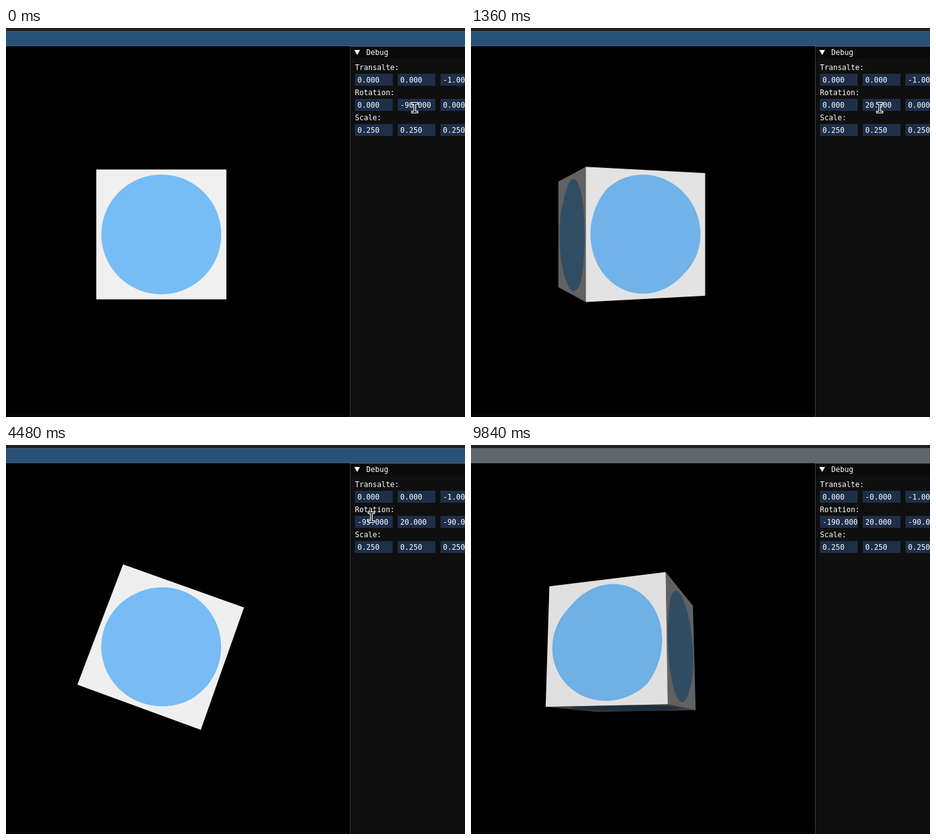
An HTML page with a canvas for the animation above (9.86 s loop, 730x620 px).

```html
<!DOCTYPE html>
<html lang="en">
<head>
<meta charset="utf-8">
<title>Cube transform panel</title>
<style>
html, body { margin: 0; width: 100%; height: 100%; overflow: hidden; background: #000; }
canvas { display: block; width: 730px; height: 620px; }
</style>
</head>
<body>
<canvas id="stage" width="730" height="620"></canvas>
<script>
const ctx = document.getElementById('stage').getContext('2d');
const LOOP = 9860;
const FOCAL = 300 / Math.tan(Math.PI / 8);
const HALF = 0.125;
const DISC = 0.922;
const COLS = [555, 623, 691];
const ROWS = [73, 113, 153];

// Drags: from, to, final value, number of equal jumps
const rotX = [[4300, 4480, -95, 4], [4760, 4880, -190, 2]];
const rotY = [[120, 320, -180, 9], [500, 540, -165, 3], [700, 700, -100, 1],
  [740, 880, -60, 3], [1180, 1360, 20, 4]];
const rotZ = [[3020, 3020, -40, 1], [3120, 3240, -90, 3]];
// the tiny negative prints as -0.000
const moveY = [[7320, 7400, 0.2, 2], [7480, 7480, -1e-4, 1],
  [7860, 8060, -0.5, 5], [8180, 8400, -1e-4, 5]];

// Pointer legs: from, to, x, y
const legs = [
  [1500, 1860, 684, 140], [1860, 2120, 662, 178], [2200, 2700, 716, 123],
  [3500, 3960, 581, 115], [5560, 5780, 662, 77], [6000, 6220, 643, 143],
  [6340, 6400, 648, 182], [6400, 6480, 643, 154], [6660, 6980, 653, 80],
  [8720, 8820, 697, 88], [8820, 9260, 188, 8], [9400, 9560, 98, -40]
];

const mix = (a, b, k) => a + (b - a) * k;
const mixPoint = (p, q, k) => [mix(p[0], q[0], k), mix(p[1], q[1], k)];

function dragged(drags, t, value, unit) {
  for (const [from, to, goal, jumps] of drags) {
    if (t < from) break;
    const done = t >= to ? jumps : 1 + Math.floor((t - from) / (to - from) * (jumps - 1));
    value = done === jumps ? goal : Math.round(mix(value, goal, done / jumps) / unit) * unit;
  }
  return value;
}

function pointerAt(t) {
  let p = [650, 127];
  for (const [from, to, x, y] of legs) {
    const k = Math.min(1, Math.max(0, (t - from) / (to - from)));
    p = mixPoint(p, [x, y], k * k * (3 - 2 * k));
  }
  return p;
}

function rect(x, y, w, h, color) {
  ctx.fillStyle = color;
  ctx.fillRect(x, y, w, h);
}

function text(s, x, y) {
  ctx.fillStyle = '#fff';
  ctx.fillText(s, x, y);
}

function poly(points, color) {
  ctx.beginPath();
  for (const [x, y] of points) ctx.lineTo(x, y);
  ctx.closePath();
  ctx.fillStyle = color;
  ctx.fill();
}

function stroke(width, color) {
  ctx.lineWidth = width;
  ctx.strokeStyle = color;
  ctx.stroke();
}

// Turn about z, then y, then x
function rotate([x, y, z], angles) {
  const [a, b, c] = angles.map(d => d * Math.PI / 180);
  [x, y] = [x * Math.cos(c) - y * Math.sin(c), x * Math.sin(c) + y * Math.cos(c)];
  [x, z] = [x * Math.cos(b) + z * Math.sin(b), z * Math.cos(b) - x * Math.sin(b)];
  [y, z] = [y * Math.cos(a) - z * Math.sin(a), y * Math.sin(a) + z * Math.cos(a)];
  return [x, y, z];
}

function shade(rgb, light) {
  return `rgb(${rgb.map(c => Math.round(c * light)).join(',')})`;
}

function drawFace(axis, side, angles, ty) {
  const at = (u, v) => {
    const p = [0, 0, 0];
    p[axis] = side;
    p[(axis + 1) % 3] = u;
    p[(axis + 2) % 3] = v;
    return rotate(p, angles);
  };
  const n = at(0, 0);
  // skip faces turned away from the eye
  if (n[1] * ty - n[2] + HALF >= 0) return;
  const corner = (u, v) => {
    const [x, y, z] = at(u, v).map(c => c * HALF);
    const k = FOCAL / (1 - z);
    return [247 + x * k, 329 - (y + ty) * k];
  };
  const a = corner(-1, -1), b = corner(1, -1), c = corner(1, 1), d = corner(-1, 1);
  // The texture is mapped flat on each half of the face, split along b-d
  const onFace = (u, v) => {
    const [o, p, q, s] = u + v < 0 ? [a, b, d, 1] : [c, d, b, -1];
    const i = (1 + s * u) / 2, j = (1 + s * v) / 2;
    return [0, 1].map(m => o[m] + (p[m] - o[m]) * i + (q[m] - o[m]) * j);
  };
  const rim = Array.from({ length: 72 }, (_, i) => {
    const angle = i * Math.PI / 36;
    return onFace(DISC * Math.cos(angle), DISC * Math.sin(angle));
  });
  const light = 0.1 + 0.9 * Math.max(0, n[2]);
  poly([a, b, c, d], shade([240, 240, 240], light));
  poly(rim, shade([119, 189, 245], light));
}

function drawView(angles, ty) {
  ctx.save();
  ctx.beginPath();
  ctx.rect(0, 29, 547, 587);
  ctx.clip();
  for (let axis = 0; axis < 3; axis++) {
    for (const side of [-1, 1]) drawFace(axis, side, angles, ty);
  }
  ctx.restore();
  rect(0, 616, 547, 4, '#070304');
}

function drawPanel(rows) {
  rect(547, 29, 183, 591, '#0f0f0f');
  rect(547, 29, 183, 19, '#0a0a0a');
  rect(547, 29, 183, 1, '#3c3c45');
  rect(547, 29, 1, 591, '#3c3c45');
  poly([[554, 35], [563, 35], [558.5, 43]], '#fff');
  text('Debug', 573, 43);
  ['Transalte:', 'Rotation:', 'Scale:'].forEach((label, r) => {
    text(label, 555, ROWS[r] - 6);
    COLS.forEach((x, c) => {
      rect(x, ROWS[r], 60, 19, '#1d2f49');
      text(rows[r][c].toFixed(3), x + 4, ROWS[r] + 14);
    });
  });
}

function drawBar(idle) {
  rect(0, 0, 730, 5, '#202020');
  rect(0, 5, 730, 24, idle ? '#666a75' : '#4a607b');
  rect(0, 6, 730, 22, idle ? '#5f676b' : '#275276');
}

function drawPointer([x, y]) {
  const overField = COLS.some(c => x >= c && x < c + 60) && ROWS.some(r => y >= r && y < r + 19);
  ctx.save();
  ctx.translate(Math.round(x), Math.round(y));
  ctx.beginPath();
  if (overField) {
    for (const s of [-1, 1]) {
      ctx.moveTo(-3.5, 7 * s);
      ctx.lineTo(3.5, 7 * s);
    }
    ctx.moveTo(0, -7);
    ctx.lineTo(0, 7);
    ctx.lineCap = 'square';
    stroke(4, '#fff');
    stroke(1.5, '#000');
  } else {
    for (const [px, py] of [[1, 2], [1, 21.5], [6.5, 15.5], [14, 15]]) ctx.lineTo(px, py);
    ctx.closePath();
    ctx.fillStyle = '#000';
    ctx.fill();
    stroke(2, '#fff');
  }
  ctx.restore();
}

function draw(t) {
  const angles = [dragged(rotX, t, 0, 5), dragged(rotY, t, -90, 5), dragged(rotZ, t, 0, 5)];
  const ty = dragged(moveY, t, 0, 0.1);
  rect(0, 0, 730, 620, '#000');
  drawView(angles, ty);
  drawPanel([[0, ty, -1], angles, [0.25, 0.25, 0.25]]);
  drawBar(t >= 9840);
  drawPointer(pointerAt(t));
}

ctx.font = '11.63px "DejaVu Sans Mono", monospace';
const start = performance.now();
function tick() {
  draw((performance.now() - start) % LOOP);
  requestAnimationFrame(tick);
}
tick();
</script>
</body>
</html>
```
